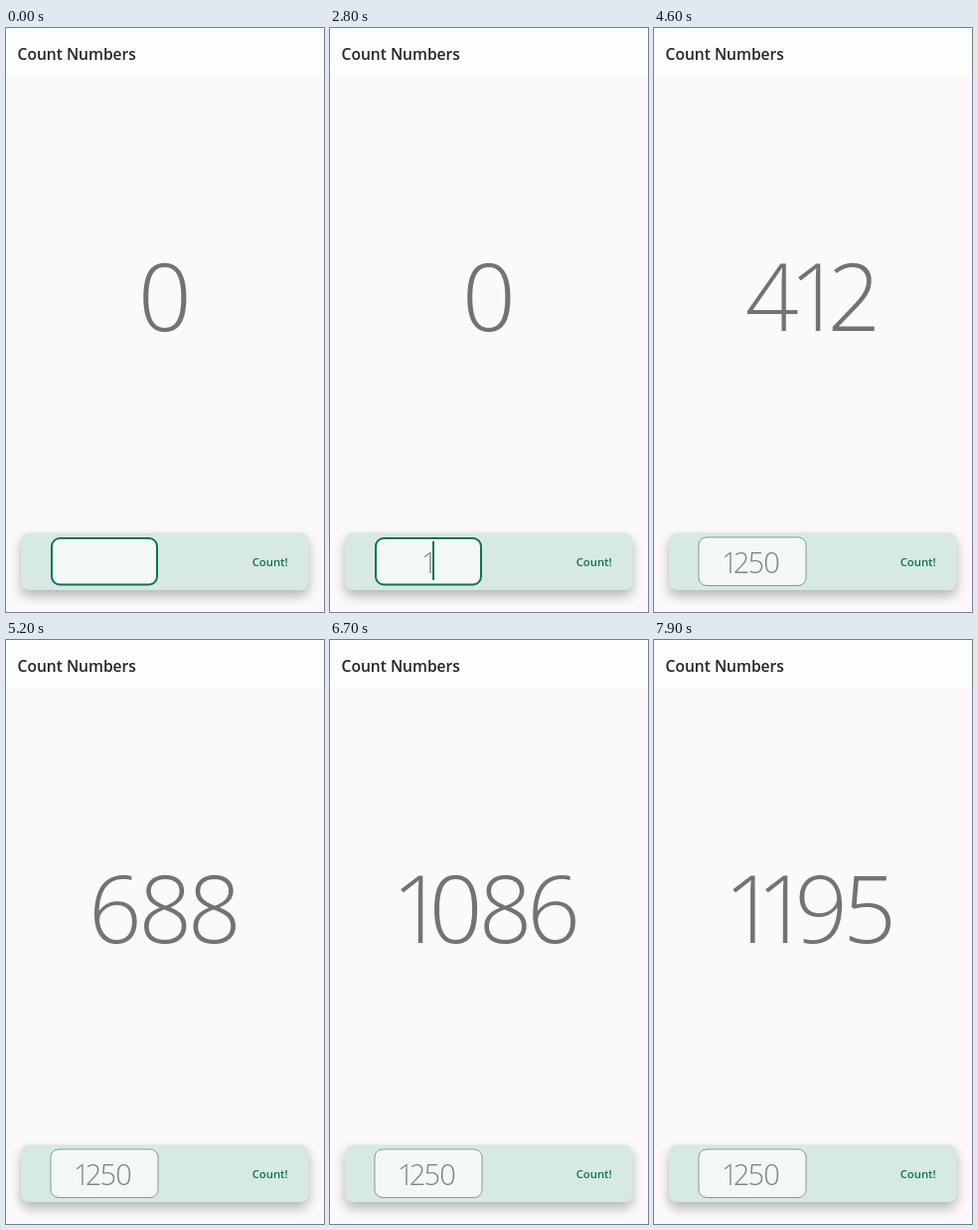
An HTML page with a canvas that plays this animation: 320 by 586 pixels, repeating every 8000 ms.

```html
<!DOCTYPE html>
<html lang="en">
<head>
<meta charset="utf-8">
<title>Count Numbers</title>
<style>
html, body { margin: 0; width: 100%; height: 100%; overflow: hidden; background: #fbf9fc; }
canvas { display: block; width: 320px; height: 586px; }
</style>
</head>
<body>
<canvas id="stage"></canvas>
<script>
const W = 320, H = 586, LOOP = 8000, STEP = 100;
const GREEN = '#0b7457';
const FONT = '"Open Sans", "Noto Sans", sans-serif';

const canvas = document.getElementById('stage');
const ctx = canvas.getContext('2d');
const dpr = window.devicePixelRatio || 1;
canvas.width = W * dpr;
canvas.height = H * dpr;

// Counter keys: time in ms, value, speed per second.
const COUNT = [
  [3650, 0, 60], [3800, 27, 330], [4600, 412, 510],
  [5800, 898, 290], [6700, 1086, 145], [7900, 1195, 50], [8000, 1200, 48]
];
// Moments at which each digit of the input is typed.
const TYPED = [[2600, '1'], [2900, '2'], [3100, '5'], [3300, '0']];

const ramp = (t, a, b) => Math.min(1, Math.max(0, (t - a) / (b - a)));

function countAt(t) {
  if (t <= COUNT[0][0]) return 0;
  const i = COUNT.findIndex(key => key[0] >= t);
  const [t0, v0, s0] = COUNT[i - 1], [t1, v1, s1] = COUNT[i];
  const d = (t1 - t0) / 1000, u = (t - t0) / (t1 - t0), w = 1 - u;
  return Math.round(
    v0 * (1 + 2 * u) * w * w + v1 * u * u * (3 - 2 * u) +
    d * u * w * (s0 * w - s1 * u));
}

function label(text, x, y, font, color) {
  ctx.font = `${font} ${FONT}`;
  ctx.fillStyle = color;
  ctx.fillText(text, x, y);
}

// Proportional figures: the 1 takes a narrower cell than the rest.
const advance = (digit, size) => size * (digit === '1' ? 0.347 : 0.526);

function textWidth(text, size) {
  return [...text].reduce((sum, digit) => sum + advance(digit, size), 0);
}

function number(text, cx, baseline, size, alpha) {
  let x = cx - textWidth(text, size) / 2;
  ctx.font = `300 ${size}px ${FONT}`;
  ctx.fillStyle = `rgba(0,0,0,${alpha})`;
  for (const digit of text) {
    const step = advance(digit, size);
    const m = ctx.measureText(digit);
    const ink = (m.actualBoundingBoxRight - m.actualBoundingBoxLeft) / 2;
    const shift = digit === '1' ? -0.036 * size : 0;
    ctx.fillText(digit, x + step / 2 + shift - ink, baseline);
    x += step;
  }
}

function box(x, y, w, h, r) {
  ctx.beginPath();
  ctx.roundRect(x, y, w, h, r);
}

function outline(x, y, w, h, width, color, alpha) {
  if (alpha <= 0) return;
  ctx.save();
  ctx.globalAlpha = alpha;
  ctx.lineWidth = width;
  ctx.strokeStyle = color;
  box(x, y, w, h, 8);
  ctx.stroke();
  ctx.restore();
}

function drawBar() {
  ctx.save();
  ctx.shadowColor = 'rgba(0,0,0,.28)';
  ctx.shadowBlur = 12 * dpr;
  ctx.shadowOffsetY = 6 * dpr;
  ctx.fillStyle = '#d6e9e3';
  box(15, 506.5, 289.5, 57.5, 8);
  ctx.fill();
  ctx.restore();
  label('Count!', 247.7, 540, '600 11.3px', GREEN);
}

function drawField(t) {
  ctx.fillStyle = '#f3f8f7';
  box(45, 511, 108, 48, 8);
  ctx.fill();
  outline(46, 512, 106, 46.5, 2, GREEN, 1 - ramp(t, 3500, 3700));
  outline(45, 511, 108, 48.5, 1, '#8d9995', ramp(t, 3800, 4100));

  const text = TYPED.filter(key => t >= key[0]).map(key => key[1]).join('');
  number(text, text.length > 1 ? 98 : 99, 547, 29, 0.47);

  const blinkOn = t >= 2500 ? t < 3500 : t % 1000 >= 500;
  if (blinkOn) {
    ctx.fillStyle = GREEN;
    const x = Math.round(98 + textWidth(text, 29) / 2);
    ctx.fillRect(x, text ? 515 : 513, 2, 39);
  }
}

function draw(t) {
  ctx.setTransform(dpr, 0, 0, dpr, 0, 0);
  ctx.fillStyle = '#fbf9fc';
  ctx.fillRect(0, 0, W, H);
  ctx.fillStyle = '#fcfefb';
  ctx.fillRect(0, 0, W, 48);
  label('Count Numbers', 11.5, 31.5, '600 15.6px', '#232625');
  number(String(countAt(t)), 160, 304, 94, 0.54);
  drawBar();
  drawField(t);
}

const start = performance.now();
function tick() {
  const t = (performance.now() - start) % LOOP;
  draw(Math.floor(t / STEP) * STEP);
  requestAnimationFrame(tick);
}
tick();
</script>
</body>
</html>
```
